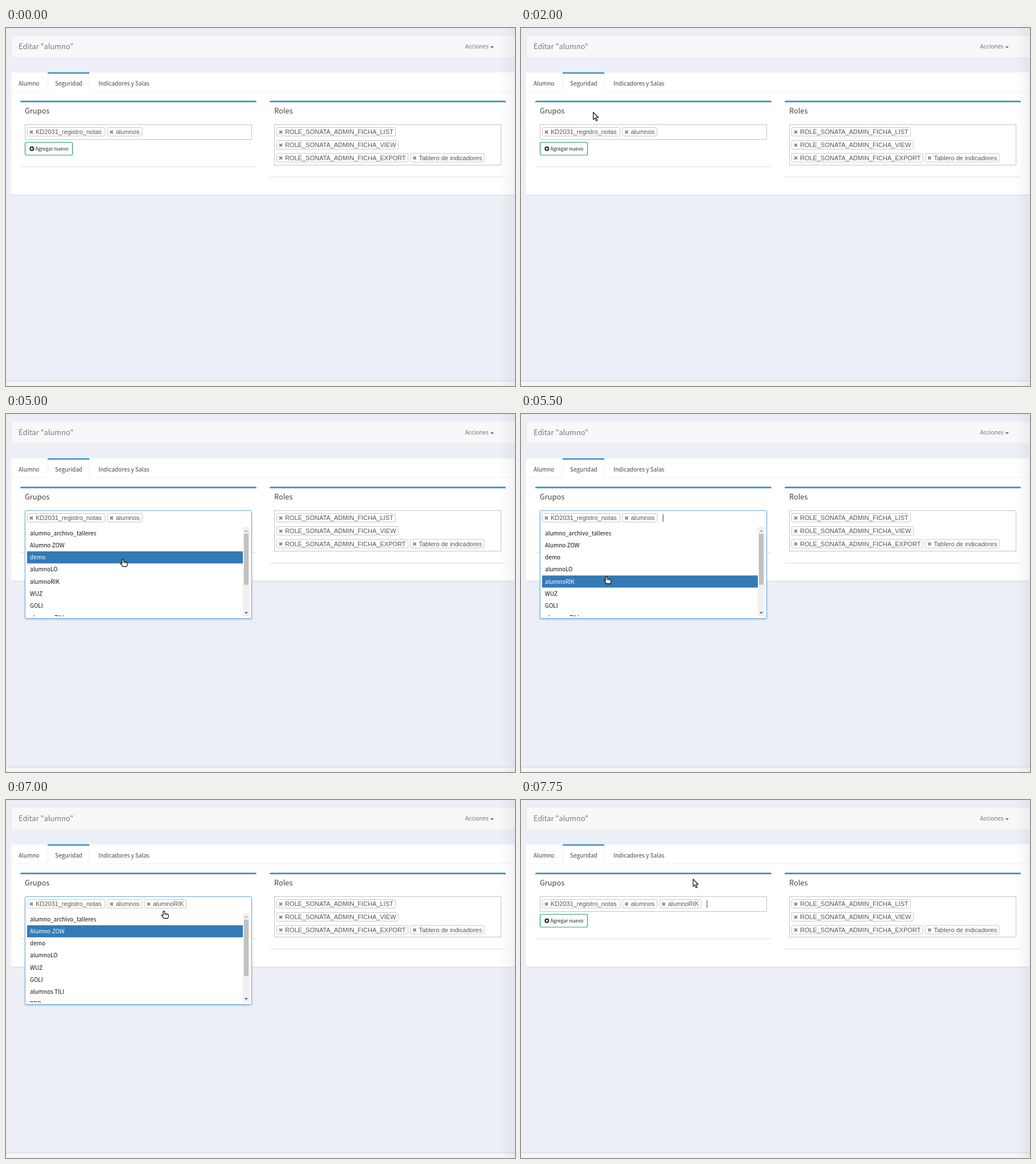
Recreate the animation shown at these times as an HTML page. Size 892 by 628 pixels, loop 8000 ms.

```html
<!DOCTYPE html>
<html lang="es">
<head>
<meta charset="utf-8">
<style>
html, body { margin: 0; width: 100%; height: 100%; overflow: hidden; background: #ecf0f6; }
svg { display: block; }
text { font: 10px "Noto Sans CJK JP", "Noto Sans CJK SC", "Open Sans", sans-serif; fill: #444; white-space: pre; }
.head { font-size: 12.8px; }
.chip { font: 11px "Liberation Sans", Arial, sans-serif; fill: #555; }
.small { font-size: 8.6px; fill: #222; }
.row { fill: #111; }
.on { fill: #fff; }
</style>
</head>
<body>
<svg id="stage" width="892" height="628" viewBox="0 0 892 628">
  <defs>
    <linearGradient id="edge">
      <stop offset="0" stop-opacity="0"/>
      <stop offset="1" stop-opacity=".05"/>
    </linearGradient>
    <filter id="soft" x="-5%" y="-5%" width="110%" height="112%">
      <feDropShadow dx="0" dy="1" stdDeviation=".6" flood-opacity=".14"/>
    </filter>
    <filter id="lift" x="-5%" y="-5%" width="110%" height="112%">
      <feDropShadow dx="0" dy="1.5" stdDeviation="1.6" flood-opacity=".22"/>
    </filter>
    <clipPath id="view"><rect x="33" y="198" width="398" height="157"/></clipPath>
  </defs>
  <g id="page"></g>
  <g id="closed"></g>
  <g id="menu"></g>
  <g id="chips"></g>
  <rect id="caret" y="176" width="1" height="13" fill="#333"/>
  <rect x="866" width="26" height="628" fill="url(#edge)"/>
  <g id="pointer" stroke="#000" fill="#fff" stroke-width="1.1" stroke-linejoin="round">
    <path id="arrow" d="M.6 .8V13.6L3.6 10.8 5.7 15.9 7.8 15 5.7 10H9.6Z"/>
    <g id="hand">
      <path d="M3.2 1.5Q4.6 .2 6 1.5V5L11.2 6Q12.7 6.5 12.7 8V11L11.6 13.6H5L1 8.8Q.6 7.2 2.2 7.4L3.4 8.3Z"/>
      <path d="M6 5.5V7.5M8.3 6V8M10.5 6.3V8.3" stroke-width=".8"/>
    </g>
  </g>
</svg>
<script>
const $ = id => document.getElementById(id);
const rect = (x, y, w, h, fill, more = '') =>
  `<rect x="${x}" y="${y}" width="${w}" height="${h}" fill="${fill}" ${more}/>`;
const text = (x, y, s, cls = '', more = '') => `<text x="${x}" y="${y}" class="${cls}" ${more}>${s}</text>`;
const chip = (x, y, w, s) =>
  rect(x + .5, y + .5, w - 1, 15, '#fff', 'rx="2" stroke="#c6c6c6"') +
  `<path d="M${x + 5} ${y + 6}l5 5m0-5l-5 5" stroke="#808080" stroke-width="1.8"/>` +
  text(x + 15, y + 12, s, 'chip');
const card = (x, h, title) =>
  rect(x, 128, 414, h, '#fff', 'rx="2" filter="url(#soft)"') +
  `<path d="M${x} 130.2V129.5Q${x} 127.5 ${x + 2} 127.5H${x + 412}Q${x + 414} 127.5 ${x + 414} 129.5V130.2Z" fill="#3c8dbc"/>` +
  text(x + 8, 150, title, 'head');
const field = (x, h) => rect(x + .5, 169.5, 397, h, '#fff', 'stroke="#c3c3c3"');

$('page').innerHTML =
  rect(0, 0, 892, 1, '#e3e7ee') +
  rect(0, 619, 892, 9, '#f4f5f6') + rect(0, 618.5, 892, 1.2, '#d6d9de') +
  rect(9.5, 12.5, 890, 40, '#f8f8f8', 'rx="3" stroke="#e7e7e7"') +
  text(22, 37, 'Editar "alumno"', 'head', 'style="fill:#777"') +
  text(804.5, 36.3, 'Acciones', '', 'style="fill:#777"') +
  '<path d="M848.5 32h6.6l-3.3 3.6z" fill="#777"/>' +
  rect(9, 78, 882, 214.5, '#fff', 'rx="2" filter="url(#soft)"') +
  rect(9, 111, 882, 1, '#f2f2f2') +
  rect(73, 78, 73, 34, '#fff') + rect(73, 80, 1, 31, '#f0f0f0') + rect(145, 80, 1, 31, '#f0f0f0') +
  rect(73, 77.7, 73, 2.4, '#3c8dbc') +
  text(22, 100.8, 'Alumno') + text(86, 100.8, 'Seguridad') + text(162, 100.8, 'Indicadores y Salas') +
  card(25, 115, 'Grupos') + card(462, 133, 'Roles') + field(470, 71) +
  chip(474, 174, 209, 'ROLE_SONATA_ADMIN_FICHA_LIST') +
  chip(474, 197, 214, 'ROLE_SONATA_ADMIN_FICHA_VIEW') +
  chip(474, 219.5, 231, 'ROLE_SONATA_ADMIN_FICHA_EXPORT') +
  chip(708.5, 219.5, 130, 'Tablero de indicadores');

$('closed').innerHTML = field(33, 26) +
  rect(33.5, 200.5, 83, 22.5, '#fff', 'rx="2.5" stroke="#25a06a" stroke-width="1.2"') +
  '<circle cx="45.3" cy="211.7" r="4" fill="#222"/><path d="M43 211.7h4.6m-2.3-2.3v4.6" stroke="#fff" stroke-width="1.4"/>' +
  text(51.5, 215, 'Agregar nuevo', 'small');

const groups = ['alumno_archivo_talleres', 'Alumno ZOW', 'demo', 'alumnoLO', 'alumnoRIK', 'WUZ', 'GOLI', 'alumnos TILI', 'PBR'];
const picked = 'alumnoRIK';
const ROW = 21.2;

function menu(added, active) {
  const rows = groups.filter(g => !added || g !== picked).slice(0, 8).map((g, i) => {
    const y = 198.2 + i * ROW, on = i === active;
    return (on ? rect(37, y + .3, 378, ROW, '#337ab7') : '') + text(42, y + 14.6, g, on ? 'on' : 'row');
  });
  return rect(33.5, 169.5, 397, 189, '#fff', 'rx="1" stroke="#66afe9" filter="url(#lift)"') +
    `<g clip-path="url(#view)">${rows.join('')}</g>` +
    rect(415, 198, 12, 157, '#f1f1f1') + rect(417, 210, 8, added ? 99 : 89.5, '#c1c1c1') +
    '<path d="M418 206.5l3-3 3 3z" fill="#a3a3a3"/><path d="M418 347.5l3 3 3-3z" fill="#505050"/>';
}
const chips = added => chip(37, 174, 137, 'KD2031_registro_notas') + chip(177.5, 174, 61.5, 'alumnos') +
  (added ? chip(242.5, 174, 74, picked) : '');

// time, x, y, hand, highlighted row
const moves = [
  [250, 23, 9], [500, 45, 35], [750, 78, 66], [1000, 104, 90], [1250, 88, 97], [1500, 118, 97],
  [2000, 126, 147], [2250, 165, 156], [2500, 205, 166], [2750, 240, 175], [3000, 263, 179],
  [3250, 268, 181], [4500, 268, 188], [5000, 200, 254, 1, 2], [5250, 172, 272, 1, 3],
  [5500, 145, 284, 1, 4], [6500, 145, 281, 1, 4], [6750, 222, 228, 1, 1], [7000, 272, 194, 1, 1],
  [7250, 297, 150, 0, 1], [7500, 303, 128, 0, 1], [7750, 301, 138]
];
const blinks = [[3250, 4000], [4500, 5000], [5500, 6500], [7750, 8000]];
const show = (id, on) => $(id).setAttribute('visibility', on ? 'visible' : 'hidden');
let last = '';

function draw(now) {
  const t = now % 8000;
  const open = t >= 3250 && t < 7750, added = t >= 6000;
  const [, x, y, hand, active] = moves.findLast(m => m[0] <= t) || [];
  show('arrow', x !== undefined && !hand);
  show('hand', hand);
  $('pointer').setAttribute('transform', `translate(${x || 0} ${y || 0})`);
  show('caret', blinks.some(([a, b]) => t >= a && t < b));
  $('caret').setAttribute('x', added ? 325.5 : 248.5);
  const state = [open, added, active].join();
  if (state !== last) {
    last = state;
    show('closed', !open);
    $('menu').innerHTML = open ? menu(added, active) : '';
    $('chips').innerHTML = chips(added);
  }
  requestAnimationFrame(tick);
}
const start = performance.now();
const tick = () => draw(performance.now() - start);
tick();
</script>
</body>
</html>
```
